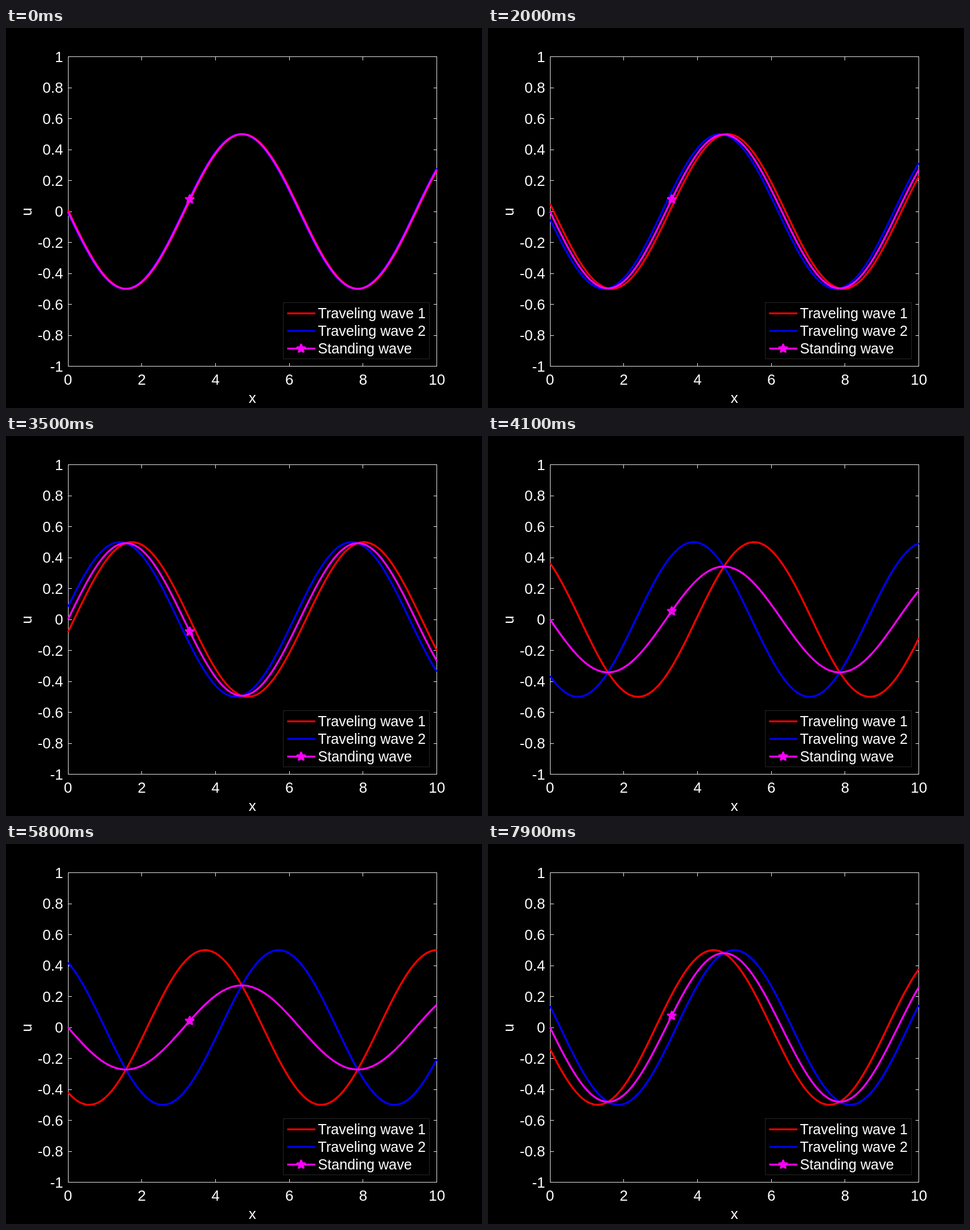
Recreate the animation shown at these times as an HTML page. Size 837 by 669 pixels, loop 8 s.

```html
<!DOCTYPE html>
<html lang="en">
<head>
<meta charset="utf-8">
<title>Standing wave</title>
<style>
  html, body { margin: 0; width: 100%; height: 100%; overflow: hidden; background: #000; }
  svg { display: block; width: 837px; height: 669px; }
  text { font: 26px "Liberation Sans", Arial, sans-serif; fill: #fff; }
  .legend text { font-size: 25.2px; }
  .axis { fill: none; stroke: #e6e6e6; stroke-width: 1; shape-rendering: crispEdges; }
  .wave { fill: none; stroke-width: 3.3; stroke-linejoin: round; }
</style>
</head>
<body>
<svg id="stage" viewBox="0 0 837 669"></svg>
<script>
const LEFT = 109, RIGHT = 757.7, TOP = 50.5, BOTTOM = 595.5;
const STEP_MS = 100, STEPS = 80;
const PHASE_START = 0.018, PHASE_STEP = 0.6325;
const RED = '#f00', BLUE = '#00f', MAGENTA = '#f0f';
const MARKER_X = 3.3;

const stage = document.getElementById('stage');
const px = x => LEFT + x / 10 * (RIGHT - LEFT);
const py = u => (TOP + BOTTOM) / 2 - u * (BOTTOM - TOP) / 2;

function add(name, attrs, parent = stage) {
  const node = document.createElementNS('http://www.w3.org/2000/svg', name);
  for (const key in attrs) node.setAttribute(key, attrs[key]);
  return parent.appendChild(node);
}

function label(text, x, y, anchor, parent = stage, extra = {}) {
  add('text', { x, y, 'text-anchor': anchor, ...extra }, parent).textContent = text;
}

const wave = (stroke, parent) => add('path', { class: 'wave', stroke }, parent);

function star(parent) {
  let d = '';
  for (let i = 0; i < 10; i++) {
    const r = i % 2 ? 3 : 7.2, a = i * Math.PI / 5;
    d += `${i ? 'L' : 'M'}${r * Math.sin(a)} ${-r * Math.cos(a)}`;
  }
  const node = wave(MAGENTA, parent);
  node.setAttribute('d', d + 'Z');
  return node;
}

const place = (node, x, y) => node.setAttribute('transform', `translate(${x} ${y})`);

function drawAxes() {
  const x0 = 109.5, x1 = 757.5, tick = 6;
  let d = `M${x0} ${TOP}H${x1}V${BOTTOM}H${x0}Z`;
  for (let x = 0; x <= 10; x += 2) {
    const at = Math.floor(px(x)) + 0.5;
    d += `M${at} ${BOTTOM}v${-tick}M${at} ${TOP}v${tick}`;
    label(x, px(x), 628.3, 'middle');
  }
  for (let i = -5; i <= 5; i++) {
    const at = Math.floor(py(i / 5)) + 0.5;
    d += `M${x0} ${at}h${tick}M${x1} ${at}h${-tick}`;
    label(i / 5, 100.5, py(i / 5) + 9.3, 'end');
  }
  add('path', { class: 'axis', d });
  label('x', 433.3, 660, 'middle');
  label('u', 0, 0, 'middle', stage, { transform: 'translate(45 323.5) rotate(-90)' });
}

function drawLegend() {
  const legend = add('g', { class: 'legend' });
  add('rect', { x: 487.5, y: 483.5, width: 257, height: 99, fill: '#000', stroke: '#262626' }, legend);
  const rows = [['Traveling wave 1', RED], ['Traveling wave 2', BLUE], ['Standing wave', MAGENTA]];
  rows.forEach(([name, color], i) => {
    const y = 502.3 + 31 * i;
    wave(color, legend).setAttribute('d', `M494.5 ${y}H544`);
    label(name, 548.5, y + 8.9, 'start', legend);
  });
  place(star(legend), 519, 564.3);
}

function curve(f) {
  const points = [];
  for (let i = 0; i <= 100; i++) points.push(`${px(i / 10).toFixed(2)} ${py(f(i / 10)).toFixed(2)}`);
  return 'M' + points.join('L');
}

drawAxes();
const first = wave(RED), second = wave(BLUE), sum = wave(MAGENTA);
const marker = star(stage);
drawLegend();

function render(ms) {
  const step = Math.floor(ms / STEP_MS) % STEPS;
  const phase = PHASE_START + PHASE_STEP * step;
  const standing = x => -0.5 * Math.sin(x) * Math.cos(phase);
  first.setAttribute('d', curve(x => -0.5 * Math.sin(x - phase)));
  second.setAttribute('d', curve(x => -0.5 * Math.sin(x + phase)));
  sum.setAttribute('d', curve(standing));
  place(marker, px(MARKER_X), py(standing(MARKER_X)));
}

const start = performance.now();
function loop() {
  render(performance.now() - start);
  requestAnimationFrame(loop);
}
loop();
</script>
</body>
</html>
```
